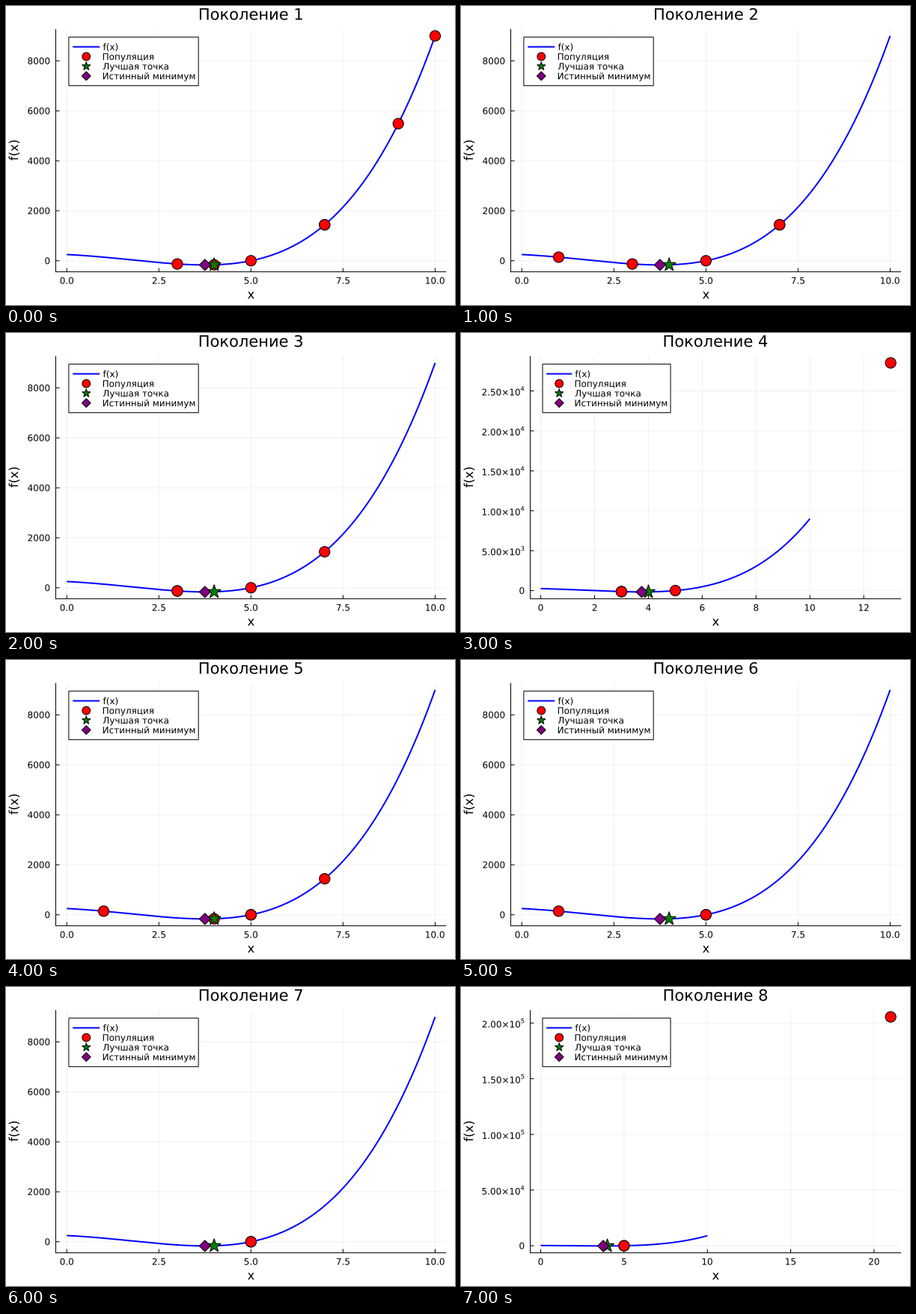
Write a matplotlib script that moves like this. It is 600x400 px and loops after 8 s.

```python
import math

import numpy as np
import matplotlib.pyplot as plt
from matplotlib.animation import FuncAnimation
from matplotlib.patches import Circle, PathPatch, Polygon, Rectangle
from matplotlib.path import Path
from matplotlib.textpath import TextPath
from matplotlib.transforms import Affine2D

plt.rcParams["font.family"] = "DejaVu Sans"
plt.rcParams["path.snap"] = False

W, H, DPI = 600, 400, 100
PX = 72 / DPI  # one pixel in points
TOP, BOTTOM, RIGHT = 30.8, 355.6, 588.2
TICK, GUIDE, TITLE = 12, 16.5, 21  # font sizes in pixels

POPULATIONS = [
    [3, 4, 5, 7, 7, 9, 10],
    [1, 3, 5, 7, 7],
    [3, 3, 5, 7],
    [3, 3, 5, 13],
    [1, 4, 5, 5, 7],
    [1, 5, 5],
    [5, 5],
    [5, 5, 21],
]
BEST, MINIMUM = 4, 3.75


def f(x):
    return (x - 2) * (x - 5) * (x + 5) ** 2


fig = plt.figure(figsize=(W / DPI, H / DPI), dpi=DPI, facecolor="white")
ax = fig.add_axes([0, 0, 1, 1])


def line(xs, ys, color="black", width=1.0, alpha=1.0):
    ax.plot(xs, ys, color=color, lw=width * PX, alpha=alpha,
            solid_capstyle="butt", solid_joinstyle="round")


def place(path, x, y, h=0.5, v=0.5, angle=0):
    """Put a text outline at x, y, aligned by its ink; v=None keeps the baseline."""
    box = path.get_extents()
    dy = 0 if v is None else box.y0 + v * box.height
    move = (Affine2D().translate(-box.x0 - h * box.width, -dy)
            .rotate_deg(angle).scale(1, -1).translate(x, y))
    ax.add_patch(PathPatch(move.transform_path(path), fc="black", lw=0, zorder=5))


def text(s, x, y, size, **align):
    place(TextPath((0, 0), s, size=size), x, y, **align)


def power_label(value):
    exp = int(math.log10(value) + 1e-9)
    main = TextPath((0, 0), f"{value / 10 ** exp:.2f}×10", size=TICK)
    end = main.get_extents().x1 + 0.7
    sup = TextPath((end, 0.5 * TICK), str(exp), size=0.7 * TICK)
    return Path.make_compound_path(main, sup)


def add_shape(shape, color):
    shape.set(facecolor=color, edgecolor="black", linewidth=PX, zorder=4)
    ax.add_patch(shape)


def dot(x, y, r):
    add_shape(Circle((x, y), r), "red")


def star(x, y, r):
    a = np.arange(10) * np.pi / 5
    rad = np.where(np.arange(10) % 2, 0.39 * r, r)
    add_shape(Polygon(np.c_[x + rad * np.sin(a), y - rad * np.cos(a)]), "green")


def diamond(x, y, r):
    add_shape(Polygon([(x, y - r), (x + r, y), (x, y + r), (x - r, y)]), "purple")


def legend(left):
    width = RIGHT - left
    x0, y0 = left + width / 30, TOP + (BOTTOM - TOP) / 30
    mid, tx = x0 + 0.0448 * width, x0 + 0.088 * width
    names = ["f(x)", "Популяция", "Лучшая точка", "Истинный минимум"]
    widest = TextPath((0, 0), names[-1], size=TICK).get_extents().width
    ax.add_patch(Rectangle((x0, y0), tx + widest + 4.8 - x0, 65, fc="white",
                           ec="black", lw=PX, zorder=3))
    rows = [y0 + 13 * (k + 1) for k in range(4)]
    half = 0.0345 * width
    ax.plot([mid - half, mid + half], [rows[0]] * 2, color="blue", lw=2 * PX,
            solid_capstyle="butt", zorder=4)
    for mark, y, r in zip((dot, star, diamond), rows[1:], (5.4, 6, 5.9)):
        mark(mid, y, r)
    for name, y in zip(names, rows):
        text(name, tx, y + 4.4, TICK, h=0, v=None)


def draw(i):
    ax.clear()
    ax.set(xlim=(0, W), ylim=(H, 0))
    ax.axis("off")

    points = POPULATIONS[i]
    xmax = max(10, max(points))
    ymin, ymax = f(MINIMUM), f(xmax)
    wide = xmax > 10
    left = 92.5 if wide else 66.5
    xpad, ypad = 0.03 * xmax, 0.03 * (ymax - ymin)

    def sx(x):
        return left + (x + xpad) / (xmax + 2 * xpad) * (RIGHT - left)

    def sy(y):
        return BOTTOM - (y - ymin + ypad) / (ymax - ymin + 2 * ypad) * (BOTTOM - TOP)

    xstep = 2.5 if xmax == 10 else 2 if xmax < 15 else 5
    ystep = 2000 if ymax < 1e4 else 5000 if ymax < 1e5 else 50000
    xticks = np.arange(0, xmax + xpad, xstep)
    yticks = np.arange(0, ymax + ypad, ystep)

    for t in xticks:
        x = sx(t)
        line([x, x], [TOP, BOTTOM], alpha=0.06)
        line([x, x], [BOTTOM, BOTTOM - 5])
        text(f"{t:.0f}" if wide else f"{t:.1f}", x, 367.3, TICK)
    for t in yticks:
        y = sy(t)
        line([left, RIGHT], [y, y], alpha=0.06)
        line([left, left + 5], [y, y])
        if wide and t > 0:
            place(power_label(t), left - 8.2, y, h=1)
        else:
            text(f"{t:.0f}", left - 8.2, y, TICK, h=1)
    line([left, left], [TOP, BOTTOM + 0.5])
    line([left - 0.5, RIGHT], [BOTTOM, BOTTOM])

    xs = np.linspace(0, 10, 201)
    line(sx(xs), sy(f(xs)), "blue", 2)
    for p in points:
        dot(sx(p), sy(f(p)), 7.1)
    star(sx(BEST), sy(f(BEST)), 9.6)
    diamond(sx(MINIMUM), sy(f(MINIMUM)), 7.6)

    legend(left)
    center = (left + RIGHT) / 2
    text(f"Поколение {i + 1}", center, 18.4, TITLE, v=None)
    text("x", center, 386.9, GUIDE)
    text("f(x)", 10.9, (TOP + BOTTOM) / 2, GUIDE, angle=90)
    return []


anim = FuncAnimation(fig, draw, frames=len(POPULATIONS), init_func=lambda: [],
                     interval=1000, repeat=True, repeat_delay=0)
plt.show()
```
